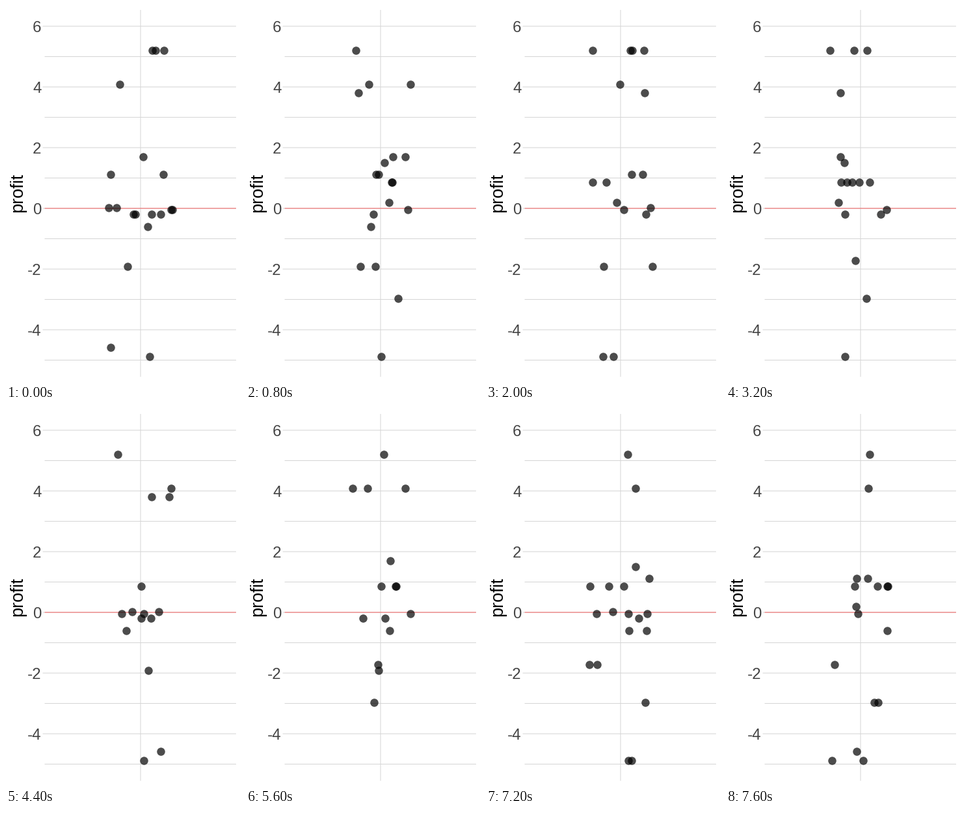
Recreate the animation shown at these times as a matplotlib script. Size 360 by 576 pixels, loop 8 s.

```python
import matplotlib.pyplot as plt
import numpy as np
from matplotlib.animation import FuncAnimation

W, H = 360, 576
LEFT, RIGHT, MID = 59.5, 354, 207
TOP, BOTTOM = 6, 568
ZERO, UNIT = 310, 46.5
STEPS, STEP_MS = 20, 400
JITTER = 49
GRID, TEXT = "#d6d6d6", "#444444"

# The observed profits, best first; each sample draws from these
PROFITS = (5.2, 4.08, 3.8, 1.7, 1.5, 1.11, 0.87, 0.87, 0.2, 0.03, -0.04,
           -0.19, -0.19, -0.6, -1.71, -1.92, -2.96, -4.57, -4.89)

plt.rcParams["font.family"] = "Liberation Sans"
fig = plt.figure(figsize=(W / 72, H / 72), dpi=72, facecolor="white")
ax = fig.add_axes([0, 0, 1, 1])
ax.set_xlim(0, W)
ax.set_ylim(H, 0)
ax.axis("off")


def y_of(profit):
    return ZERO - UNIT * profit


def line(xs, ys, color=GRID, **style):
    ax.plot(xs, ys, color=color, lw=1.05, solid_capstyle="butt",
            snap=False, zorder=1, **style)


def resample(step):
    """Draw profits with replacement and jitter them sideways."""
    rng = np.random.default_rng(step)
    # Samples take turns in holding the best and the worst profit
    extreme = PROFITS[0] if step % 2 == 0 else PROFITS[-1]
    picks = np.append(rng.choice(PROFITS, rng.integers(14, 19)), extreme)
    xs = MID + rng.uniform(-JITTER, JITTER, len(picks))
    return np.column_stack([xs, y_of(picks)])


for value in range(-5, 7):
    y = y_of(value)
    labelled = value % 2 == 0
    line((LEFT - 3 if labelled else LEFT, RIGHT), (y, y))
    if labelled:
        ax.text(54.5, y + 8.8, str(value), size=24, color=TEXT,
                ha="right", va="baseline")
line((MID, MID), (TOP, BOTTOM))
line((LEFT, RIGHT), (ZERO, ZERO), "red", alpha=0.55)
ax.text(25, 285.5, "profit", size=27, color="black", rotation=90,
        rotation_mode="anchor", ha="center", va="baseline")

dots = ax.scatter([], [], s=12.5 ** 2, color="black", alpha=0.7,
                  linewidths=0, zorder=2)


def draw(step):
    dots.set_offsets(resample(step))
    return (dots,)


anim = FuncAnimation(fig, draw, frames=STEPS, interval=STEP_MS,
                     repeat=True, repeat_delay=0)
plt.show()
```
